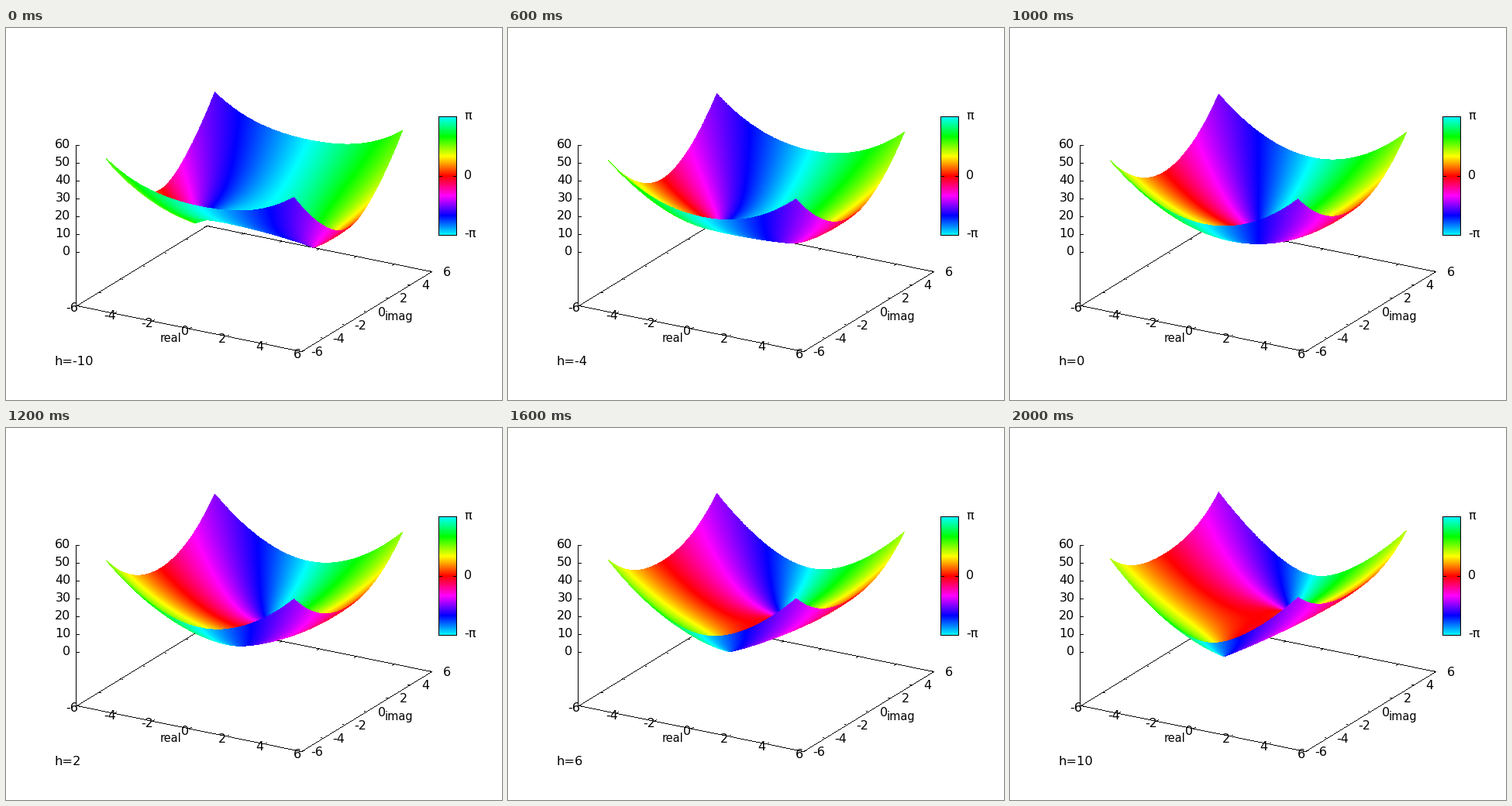
Animation of 640x480 px, one loop 2.1 s. Source, as a matplotlib script:

```python
import numpy as np
import matplotlib.pyplot as plt
from matplotlib.animation import FuncAnimation
from matplotlib.colors import hsv_to_rgb

W, H, DPI = 640, 480, 100
PX = 72 / DPI
CX, CY = 320, 335.9
X_UNIT, Y_UNIT = 27.95, 19.85
Z_UNIT, Z_LIFT = 2.292, 68.76

plt.rcParams["font.family"] = "DejaVu Sans"
fig = plt.figure(figsize=(W / DPI, H / DPI), dpi=DPI, facecolor="white")
ax = fig.add_axes([0, 0, 1, 1])
ax.axis("off")

base = np.ones((H, W, 3))


def ground(re, im):
    """Screen position of a point on the base plane."""
    x = CX + X_UNIT * (0.866 * re + 0.5 * im)
    y = CY + Y_UNIT * (0.25 * re - 0.433 * im)
    return x, y


def line(p, q):
    """Crisp one-pixel line without smoothing."""
    (x0, y0), (x1, y1) = np.rint([p, q])
    n = int(max(abs(x1 - x0), abs(y1 - y0))) + 1
    rows = np.rint(np.linspace(y0, y1, n)).astype(int)
    cols = np.rint(np.linspace(x0, x1, n)).astype(int)
    base[rows, cols] = 0


def outline(points):
    for a, b in zip(points, points[1:] + points[:1]):
        line(a, b)


def text(x, y, s, ha="center", size=16):
    return ax.text(x, y, s, ha=ha, va="baseline", size=size * PX,
                   color="black", zorder=5)


def phase_color(phase):
    hue = (phase / (2 * np.pi)) % 1.0
    one = np.ones_like(hue)
    return hsv_to_rgb(np.stack([hue, one, one], axis=-1))


# Base frame, with ticks pointing inwards from all four edges
corners = [ground(*c) for c in ((-6, -6), (6, -6), (6, 6), (-6, 6))]
outline(corners)
for v in range(-6, 7, 2):
    for side in (-1, 1):
        line(ground(v, 6 * side), ground(v, 5.8 * side))
        line(ground(6 * side, v), ground(5.86 * side, v))
    x, y = ground(v, -6)
    text(x - 5.5, y + 8.5, str(v))
    x, y = ground(6, v)
    text(x + 20, y + 6, str(v))

# Vertical axis
x, floor = 90, corners[0][1]
line((x, floor), (x, floor - Z_LIFT - 60 * Z_UNIT))
for v in range(0, 61, 10):
    y = floor - Z_LIFT - v * Z_UNIT
    line((x, y), (x + 4, y))
    text(83.5, y + 4, str(v), "right")

text(212, 405, "real", size=14.5)
text(506.5, 377, "imag", size=14.5)
label = text(63, 434.7, "", "left", size=16.2)

# Colour bar
L, R, T, B = 558, 581, 114, 267
base[T:B + 1, L:R + 1] = phase_color(np.linspace(np.pi, -np.pi, B - T + 1))[:, None]
outline([(L, T), (R, T), (R, B), (L, B)])
line((L, 191), (L + 4, 191))
line((R - 4, 191), (R, 191))
text(591.5, 118, "π", "left")
text(591.5, 195, "0", "left")
text(591.5, 270.5, "-π", "left")

# Surface samples, ordered from back to front
N = 800
re, im = np.meshgrid(np.linspace(-5, 5, N), np.linspace(5, -5, N))
square = (re + 1j * im) ** 2
gx, gy = ground(re, im)
cols = np.rint(gx).astype(int).ravel()

view = ax.imshow(base, extent=(0, W, H, 0), aspect="auto",
                 interpolation="nearest", zorder=1)
ax.set_xlim(0, W)
ax.set_ylim(H, 0)


def update(i):
    h = i - 10
    f = square + h
    rows = np.rint(gy - Z_LIFT - Z_UNIT * np.abs(f)).astype(int).ravel()
    # Nearer samples come later and win the pixel
    top = np.zeros(W * H, dtype=int)
    top[rows * W + cols] = np.arange(1, N * N + 1)
    hit = top > 0
    img = base.reshape(-1, 3).copy()
    img[hit] = phase_color(np.angle(f.ravel()[top[hit] - 1]))
    view.set_data(img.reshape(H, W, 3))
    label.set_text(f"h={h}")
    return view, label


anim = FuncAnimation(fig, update, frames=21, interval=100, repeat=True,
                     repeat_delay=0, blit=False)
plt.show()
```
